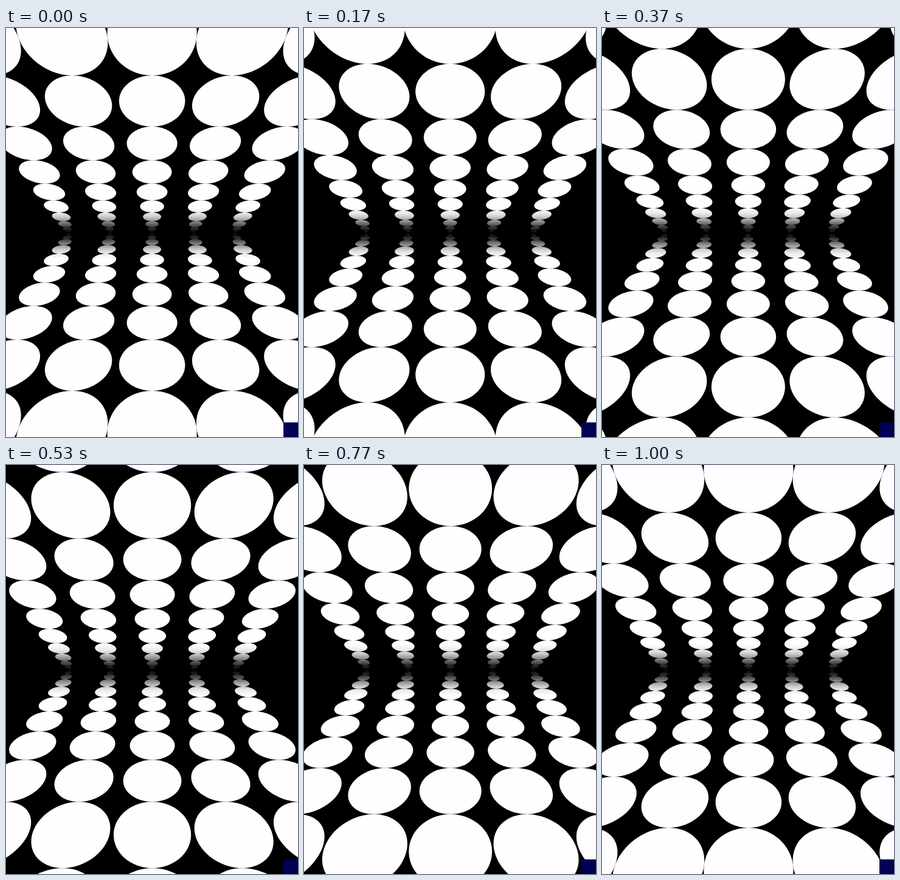
An HTML page with a canvas for the animation above (1.03 s loop, 480x672 px).

```html
<!DOCTYPE html>
<html lang="en">
<head>
<meta charset="utf-8">
<title>Dot planes</title>
<style>
  html, body { margin: 0; width: 100%; height: 100%; overflow: hidden; background: #000; }
  canvas { display: block; width: 480px; height: 672px; }
</style>
</head>
<body>
<canvas id="stage" width="480" height="672"></canvas>
<script>
const ctx = document.getElementById('stage').getContext('2d');
const LOOP = 1030, STEPS = 30;
const HORIZON = 337;    // mirror line between ceiling and floor
const VANISH = 279;     // vanishing point lies this far past the horizon
const SPACING = 0.244;  // column distance on the plane
const ROWS = 10;
const POINTS = 80;

const lerp = (a, b, p) => a + (b - a) * p;

// Depth of the edge between rows; row diameters shrink evenly to zero.
const edge = i => (35.777 - 0.191 * (ROWS - i) * (ROWS + 1 - i)) * 1e-4;
const size = i => 1 - i / ROWS;

// Brightness by distance from the horizon
const shades = [[0, 8], [5, 28], [9, 52], [14, 95], [20, 150], [27, 205], [33, 236], [42, 255]];
const FADE = 42;
const fade = ctx.createLinearGradient(0, HORIZON - FADE, 0, HORIZON + FADE);
for (const [dist, level] of shades) {
  for (const side of [-1, 1]) {
    fade.addColorStop((1 + side * dist / FADE) / 2, `rgb(${level},${level && level - level / 128},${level})`);
  }
}

// Project a circle lying on the ceiling (side -1) or floor (side 1).
function dot(cx, x, depth, rx, rd, side) {
  ctx.beginPath();
  for (let i = 0; i < POINTS; i++) {
    const a = i / POINTS * Math.PI * 2;
    const z = depth + rd * Math.sin(a);
    ctx.lineTo(cx + (x + rx * Math.cos(a)) / z, HORIZON + side * (1 / z - VANISH));
  }
  ctx.closePath();
  ctx.fill();
}

function draw(p) {
  const cx = 240.1 + 0.8 * p;
  ctx.fillStyle = '#000';
  ctx.fillRect(0, 0, 480, 672);
  ctx.fillStyle = fade;
  for (let row = ROWS; row >= 0; row--) {
    const near = lerp(edge(row), edge(row - 1), p);
    const far = lerp(edge(row + 1), edge(row), p);
    const rx = SPACING / 2 * lerp(size(row), size(row - 1), p);
    if (rx <= 0) continue;
    for (let col = -2; col <= 2; col++) {
      for (const side of [-1, 1]) {
        dot(cx, col * SPACING, (near + far) / 2, rx, (far - near) / 2, side);
      }
    }
  }
  ctx.fillStyle = '#000055';
  ctx.fillRect(456, 648, 24, 24);
}

const start = performance.now();
let shown = -1;
function tick() {
  const t = (performance.now() - start) % LOOP;
  const step = Math.floor((Math.floor(t / 10) + 0.5) * 0.3);
  if (step !== shown) draw(step / STEPS);
  shown = step;
  requestAnimationFrame(tick);
}
tick();
</script>
</body>
</html>
```
